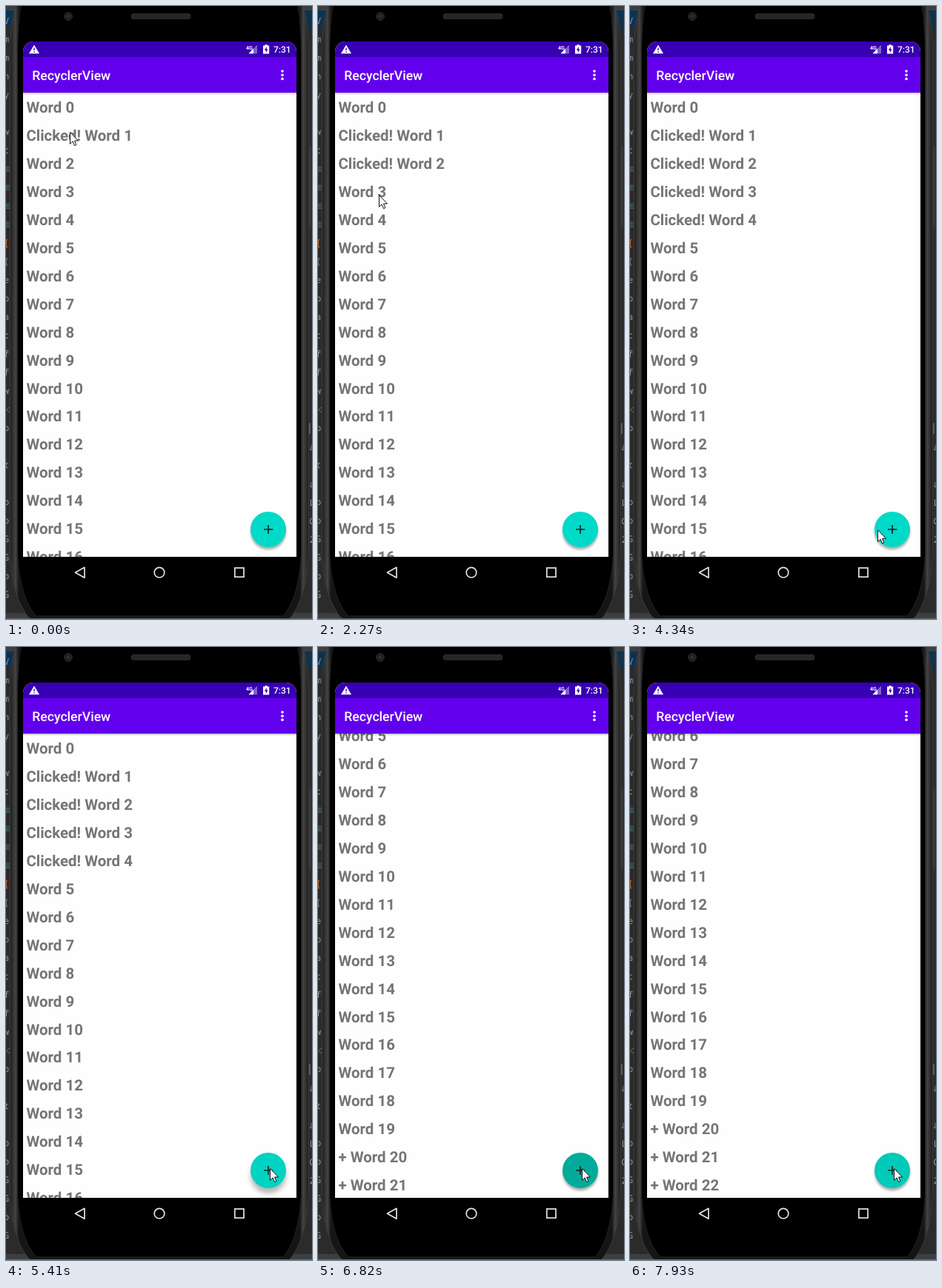
Recreate the animation shown at these times as an HTML page. Size 413 px wide and 828 px high, loop 8000 ms.

```html
<!DOCTYPE html>
<html lang="en">
<head>
<meta charset="utf-8">
<title>RecyclerView</title>
<style>
html, body { margin: 0; width: 100%; height: 100%; overflow: hidden; background: #2b2b2b; }
svg { display: block; width: 413px; height: 828px; font-family: Roboto, sans-serif; text-rendering: geometricPrecision; }
#list { font-size: 20.45px; font-weight: 700; fill: #757575; }
#code { font: 12px "Noto Sans Mono", monospace; fill: #8d99a6; }
.nav { fill: none; stroke: #e4e4e4; stroke-width: 1.7; }
</style>
</head>
<body>
<svg viewBox="0 0 413 828">
  <defs>
    <clipPath id="view"><rect x="23" y="117" width="369" height="627"/></clipPath>
    <clipPath id="screen"><path d="M23 744V62a14 14 0 0 1 14-14H378a14 14 0 0 1 14 14V744Z"/></clipPath>
    <linearGradient id="drop" x2="0" y2="1">
      <stop stop-opacity=".26"/><stop offset="1" stop-opacity="0"/>
    </linearGradient>
    <linearGradient id="rim">
      <stop stop-color="#1c1c1c"/><stop offset=".018" stop-color="#444"/><stop offset=".03" stop-color="#151515"/>
      <stop offset=".97" stop-color="#151515"/><stop offset=".982" stop-color="#444"/><stop offset="1" stop-color="#1c1c1c"/>
    </linearGradient>
    <filter id="blur" x="-30%" y="-30%" width="160%" height="160%"><feGaussianBlur id="soft"/></filter>
  </defs>

  <rect width="413" height="828" fill="#2b2b2b"/>
  <rect width="413" height="6" fill="#3c3f41"/>
  <rect y="6" width="413" height="22" fill="#0d3350"/>
  <rect y="820" width="413" height="8" fill="#3c3f41"/>
  <g id="code"></g>

  <path d="M15-5C8 12 5.5 38 5.5 70V735C6 775 16 812 33 828H382C398 812 408 775 408.5 735V70C408.5 38 406 12 399-5Z" fill="url(#rim)" stroke="#3c3c3c"/>
  <path d="M21-5C17 14 15.5 40 15.5 70V735C16 772 25 808 41 824H374C389 808 398 772 398.5 735V70C398.5 40 397 14 393-5Z" stroke="#242424"/>
  <path d="M410.5 190V300" stroke="#3a3a3a" stroke-width="2"/>
  <path d="M0 827.5H413" stroke="#666"/>
  <rect x="169" y="10.5" width="80" height="7" rx="3" fill="#262626" stroke="#343434" stroke-width=".7"/>
  <circle cx="84" cy="14" r="5.3" fill="#1d1d20" stroke="#303034"/>
  <circle cx="84" cy="14" r="2.2" fill="#29304a"/>

  <g clip-path="url(#screen)">
    <rect x="23" y="48" width="369" height="697" fill="#fefefe"/>
    <g clip-path="url(#view)"><g id="list"></g></g>
    <rect x="23" y="117" width="369" height="3" fill="url(#drop)"/>
    <rect x="23" y="48" width="369" height="21.3" fill="#3700b3"/>
    <rect x="23" y="69" width="369" height="48" fill="#6200ee"/>
    <g clip-path="url(#view)">
      <circle id="shade" cx="354" r="24" filter="url(#blur)"/>
    </g>
    <circle id="fab" cx="354" cy="707" r="24"/>
    <path d="M348 707h12M354 701v12" stroke="#102020" stroke-width="1.6"/>
  </g>

  <path d="M38 52.5L45 64.2H31Z" fill="#fff"/>
  <path d="M38 56.5v3.6M38 61.3v1.4" stroke="#3700b3" stroke-width="1.4"/>
  <path d="M339 52.5V64.2H327.5Z" fill="#fff" opacity=".38"/>
  <path d="M334 57.5V64.2H327.5Z" fill="#fff"/>
  <text x="324" y="58.5" font-size="7" font-weight="700" fill="#fff">4G</text>
  <path d="M347 53.6h2.4v-1.4h3.4v1.4h2.4V64.6h-8.2Z" fill="#fff"/>
  <path d="M351.8 55L348.8 59.8h2v3.4l2.8-4.8h-1.8Z" fill="#3700b3"/>
  <text x="361" y="63" font-size="12" font-weight="500" fill="#fff">7:31</text>
  <text x="35.3" y="99.5" font-size="17.6" font-weight="500" fill="#fff">RecyclerView</text>
  <g fill="#fff"><circle cx="373" cy="88" r="1.8"/><circle cx="373" cy="93.2" r="1.8"/><circle cx="373" cy="98.4" r="1.8"/></g>

  <g class="nav">
    <path d="M93.5 765.2L106 758.3V772.2Z" stroke-linejoin="round"/>
    <circle cx="207" cy="765.2" r="6.8"/>
    <rect x="308.8" y="759" width="12.2" height="12.2"/>
  </g>

  <path id="mouse" d="M.5.5V16.3L4.1 12.9 6.5 18.6 8.9 17.6 6.5 12H11.5Z" fill="#fff" stroke="#111" stroke-width="1"/>
</svg>
<script>
const LOOP = 8000, STEP = 130, SETTLE = 120;
const PITCH = 37.94, TOP = 144.1, WORDS = 20, VIEW = 628;

const moves = [
  { from: 0, to: 0, x: 86, y: 170 },
  { from: 520, to: 910, x: 83, y: 201 },
  { from: 2030, to: 2270, x: 82, y: 255 },
  { from: 3080, to: 3350, x: 79, y: 294 },
  { from: 4190, to: 4190, x: 269, y: 694 },
  { from: 4340, to: 4590, x: 386, y: 718 },
  { from: 4740, to: 4890, x: 356, y: 704 }
];
const clicks = [Infinity, 0, 1440, 2830, 3910];
const presses = [
  { down: 5290, up: 5560, ripple: .15 },
  { down: 6700, up: 6700, ripple: 1 },
  { down: 7650, up: 7800, ripple: .33 }
];

const $ = id => document.getElementById(id);
const clamp = v => Math.min(1, Math.max(0, v));
const easeOut = p => 1 - (1 - p) ** 2;
const set = (id, attrs) => {
  for (const name in attrs) $(id).setAttribute(name, attrs[name]);
};

function text(parent, x, y, str) {
  const el = document.createElementNS("http://www.w3.org/2000/svg", "text");
  el.setAttribute("x", x);
  el.setAttribute("y", y);
  el.textContent = str;
  parent.append(el);
  return el;
}

// slivers of the editor on both sides of the phone
[..."Vmmny wc▤▤▤▤[(epacffw◇p t bbGGpG"].forEach((c, i) => {
  const el = text($("code"), -3, 24 + i * 25, c);
  if (c === "▤") el.style.fill = "#4d9a94";
  if (c === "[") el.style.fill = "#cc6b32";
});
[..."▏a aLG2"].forEach((c, i) => text($("code"), 409.5, 575 + i * 25, c));

const rows = Array.from({ length: WORDS + presses.length },
  (_, i) => text($("list"), 27.4, TOP + i * PITCH, ""));

function label(i, t) {
  if (i >= WORDS) return t < presses[i - WORDS].up ? "" : "+ Word " + i;
  return (t >= clicks[i] ? "Clicked! " : "") + "Word " + i;
}

// the pointer is sampled once per STEP and slows toward each stop
function pointer(t) {
  const i = moves.findLastIndex(m => m.from <= t);
  const m = moves[i], prev = moves[i - 1] || m;
  const n = Math.round((m.to - m.from) / STEP);
  const k = n && Math.floor((t - m.from) / (m.to - m.from) * n);
  const p = easeOut(clamp((k + 1) / (n + 1)));
  return [prev.x + (m.x - prev.x) * p, prev.y + (m.y - prev.y) * p];
}

function scrolled(t) {
  return presses.reduce((sum, { up }, i) => {
    const way = i ? PITCH : (WORDS + 1) * PITCH - VIEW;
    return sum + way * (t < up ? 0 : t < up + SETTLE ? .65 : 1);
  }, 0);
}

function draw(t) {
  rows.forEach((el, i) => {
    const str = label(i, t);
    if (el.textContent !== str) el.textContent = str;
  });
  set("list", { transform: `translate(0 ${-scrolled(t)})` });

  const press = presses.findLast(p => p.down <= t);
  const lift = press && t < press.up + SETTLE ? 1 : 0;
  const dark = press ? press.ripple * clamp(1 - (t - press.up - 140) / 250) : 0;
  set("fab", { fill: `rgb(0 ${218 - 46 * dark} ${200 - 47 * dark})` });
  set("shade", { cy: 710.5 + 3.5 * lift, "fill-opacity": .3 - .03 * lift });
  set("soft", { stdDeviation: 1.8 + 1.6 * lift });
  set("mouse", { transform: `translate(${pointer(t)})` });
}

const start = performance.now();
function tick(now) {
  draw(Math.max(0, now - start) % LOOP);
  requestAnimationFrame(tick);
}
draw(0);
requestAnimationFrame(tick);
</script>
</body>
</html>
```
